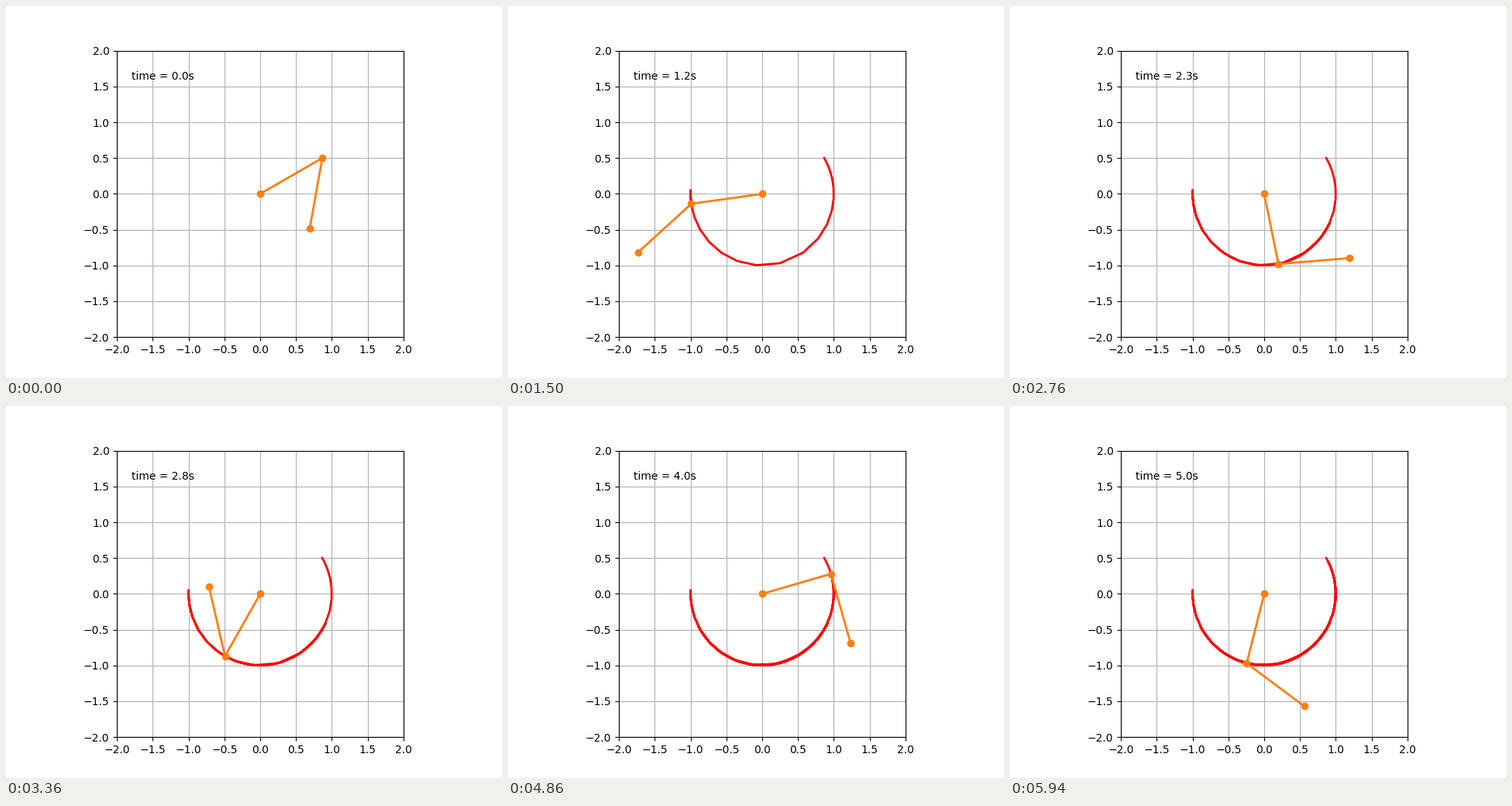
Write a matplotlib script that moves like this. It is 640x480 px and loops after 6000 ms.

```python
import numpy as np
import matplotlib.pyplot as plt
from matplotlib.animation import FuncAnimation

G = 9.8          # gravity; both rods and both masses are 1
DT = 0.05        # simulated seconds per frame
FRAMES = 100
SUBSTEPS = 50


def derivs(state):
    """Time derivative of (angle 1, speed 1, angle 2, speed 2)."""
    a1, w1, a2, w2 = state
    s, c = np.sin(a2 - a1), np.cos(a2 - a1)
    den = 2 - c * c
    g1, g2 = G * np.sin(a1), G * np.sin(a2)
    acc1 = (w1 * w1 * s * c + g2 * c + w2 * w2 * s - 2 * g1) / den
    acc2 = (-w2 * w2 * s * c + 2 * (g1 * c - w1 * w1 * s - g2)) / den
    return np.array([w1, acc1, w2, acc2])


def rk4(state, h):
    k1 = derivs(state)
    k2 = derivs(state + h / 2 * k1)
    k3 = derivs(state + h / 2 * k2)
    k4 = derivs(state + h * k3)
    return state + h / 6 * (k1 + 2 * k2 + 2 * k3 + k4)


def simulate():
    state = np.radians([120.0, 0.0, -10.0, 0.0])
    states = [state]
    for _ in range(FRAMES - 1):
        for _ in range(SUBSTEPS):
            state = rk4(state, DT / SUBSTEPS)
        states.append(state)
    return np.array(states)


path = simulate()
x1, y1 = np.sin(path[:, 0]), -np.cos(path[:, 0])
x2, y2 = x1 + np.sin(path[:, 2]), y1 - np.cos(path[:, 2])

plt.rcParams["font.family"] = "DejaVu Sans"
fig = plt.figure(figsize=(6.4, 4.8), dpi=100)
ax = fig.add_subplot(autoscale_on=False, xlim=(-2, 2), ylim=(-2, 2))
ax.set_aspect("equal")
ticks = np.arange(-2, 2.1, 0.5)
ax.set_xticks(ticks)
ax.set_yticks(ticks)
ax.grid()

trace, = ax.plot([], [], "r-", lw=2)
rods, = ax.plot([], [], "o-", color="C1", lw=2)
label = ax.text(0.05, 0.9, "", transform=ax.transAxes)


def update(i):
    trace.set_data(x1[:i + 1], y1[:i + 1])
    rods.set_data([0, x1[i], x2[i]], [0, y1[i], y2[i]])
    label.set_text(f"time = {i * DT:.1f}s")
    return trace, rods, label


anim = FuncAnimation(fig, update, frames=FRAMES, interval=60,
                     repeat=True, repeat_delay=0)
plt.show()
```
